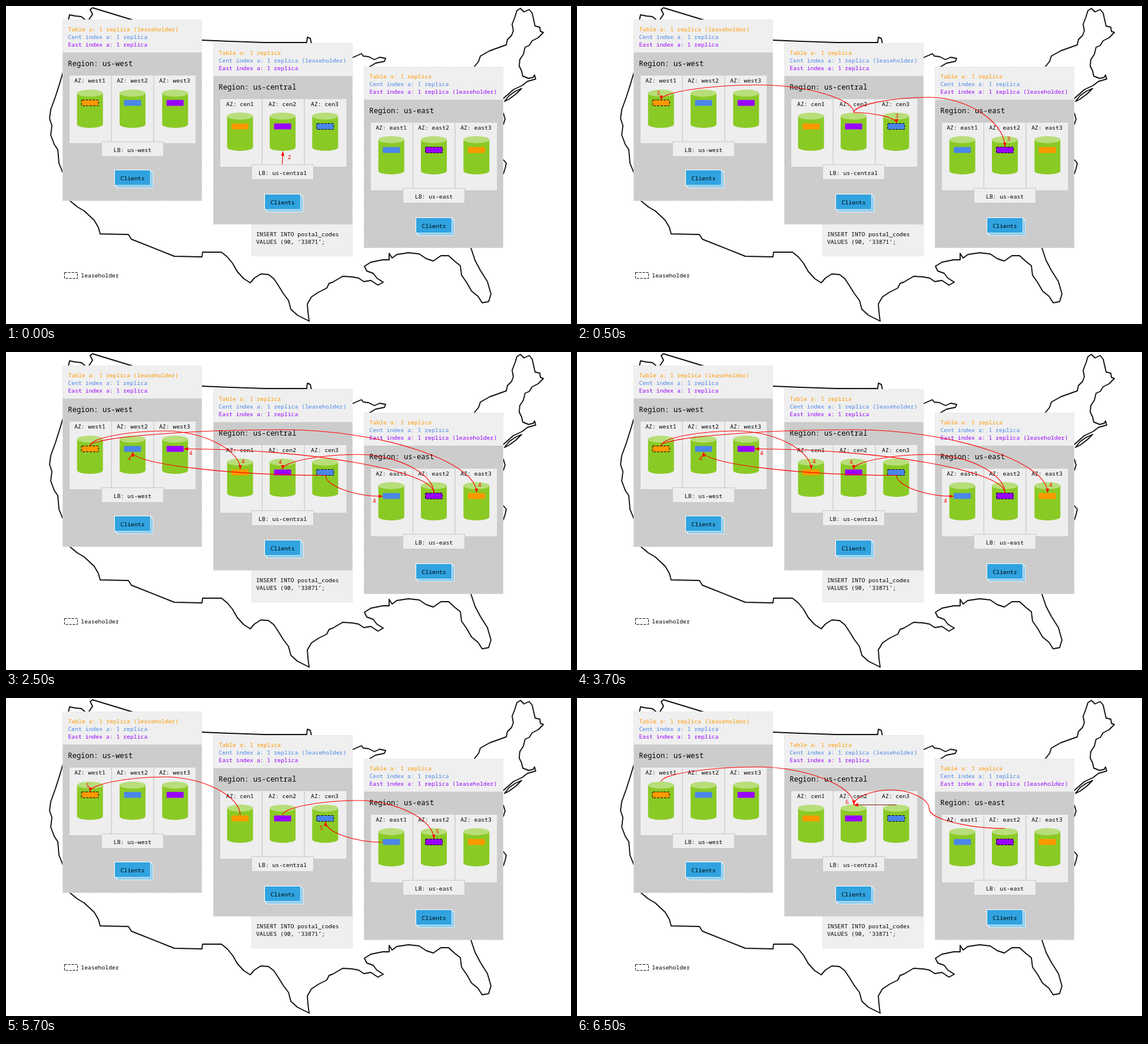
An HTML page that plays this animation: 960x540 px, repeating every 8 s.

```html
<!DOCTYPE html>
<html lang="en">
<head>
<meta charset="utf-8">
<title>Replicated index writes</title>
<style>
  html, body { margin: 0; width: 100%; height: 100%; overflow: hidden; background: #fff; }
  svg { display: block; width: 100vw; height: 100vh; }
  text { font: 9.775px "Noto Sans Mono", "DejaVu Sans Mono", monospace; white-space: pre; }
  .title { font-size: 12.22px; }
  .mid { text-anchor: middle; }
  .map { fill: none; stroke: #111; stroke-width: 1.9; stroke-linejoin: round; stroke-linecap: round; }
  .light { fill: #efefef; }
  .edge { fill: none; stroke: #e2e2e2; stroke-dasharray: 2 2; }
  .box { fill: #eee; stroke: #c8c8c8; }
  .lease { stroke: #000; stroke-dasharray: 4 2; }
  .wire { fill: none; stroke: #f00; stroke-width: 1.1; }
  .step text { fill: #f00; }
  .step { opacity: 0; animation: 8s step-end infinite; }
  #step2 { animation-name: s2; }
  #step3 { animation-name: s3; }
  #step4 { animation-name: s4; }
  #step5 { animation-name: s5; }
  #step6 { animation-name: s6; }
  @keyframes s2 { 0% { opacity: 1 } 6.25%, 100% { opacity: 0 } }
  @keyframes s3 { 0% { opacity: 0 } 6.25% { opacity: 1 } 31.25%, 100% { opacity: 0 } }
  @keyframes s4 { 0% { opacity: 0 } 31.25% { opacity: 1 } 56.25%, 100% { opacity: 0 } }
  @keyframes s5 { 0% { opacity: 0 } 56.25% { opacity: 1 } 81.25%, 100% { opacity: 0 } }
  @keyframes s6 { 0% { opacity: 0 } 81.25%, 100% { opacity: 1 } }
</style>
</head>
<body>
<svg id="stage" viewBox="0 0 960 540">
  <defs>
    <marker id="head" markerUnits="userSpaceOnUse" markerWidth="9" markerHeight="8" refX="7.5" refY="3.5" orient="auto">
      <path d="M0 .5L7.5 3.5L0 6.5Z" fill="#f00"/>
    </marker>
  </defs>
  <g class="map">
    <!-- north-west corner and Pacific coast -->
    <path d="M106 24L108 15L118 17L128 18L134 23M141 23L147 14L143 6L147 3L180 13L216 24"/>
    <path d="M97 112L91 132L84 154L76 176L74 191L78 203L76 219L82 235L88 244L89 255L90 267L97 284"/>
    <!-- southern border -->
    <path d="M109 331L121 341L133 348L150 364L157 376L160 387L208 388L213 396L286 425L333 426L334 418L366 418L376 426L385 437L393 451L404 463L415 470L422 462L433 455L446 456L455 463L463 475L471 488L480 500L484 515L495 525L515 535"/>
    <!-- Gulf and Florida -->
    <path d="M515 535L513 519L512 506L519 494L531 486L545 479L549 471L555 469L572 459L588 460L599 462L608 468L620 466L632 474L641 469L630 462L624 454L613 450L609 442L620 435L640 431L651 431L651 420L656 428L664 422L684 419L702 421L714 429L726 433L739 424L752 424L763 434L772 441L774 457L783 470L791 484L802 493L809 504L820 502L824 489L818 468L806 449L797 432L790 411"/>
    <!-- northern border and lakes -->
    <path d="M333 58L380 60L440 62L511 62L512 53L517 55L519 64M588 88L597 84L604 81L607 85L616 86L626 91L635 87L645 89L643 94L628 97L618 103"/>
    <!-- north-east -->
    <path d="M795 104L803 94L806 85L822 76L850 66L852 57L859 50L862 42L860 31L865 18L868 8L874 4L880 10L889 6L894 12L899 34L907 36L908 43L913 45L904 54L894 59L889 67L882 70L879 82L873 91L872 102L876 110L878 119L888 123L896 121L898 117L900 124L886 128L877 135L862 142L853 150L845 157"/>
    <path d="M847 162L855 152L865 145L876 140L867 149L855 158ZM845 182L848 192L845 201M845 261L850 267L848 276L845 285"/>
  </g>
  <g id="board"></g>
  <g id="wires"></g>
</svg>
<script>
const orange = '#ff9900', blue = '#4a86e8', purple = '#9900ff';
const rect = (x, y, w, h, attrs) => `<rect x="${x}" y="${y}" width="${w}" height="${h}" ${attrs}/>`;
const text = (x, y, str, attrs = '') => `<text x="${x}" y="${y}" ${attrs}>${str}</text>`;

const regions = [
  { name: 'west', az: 'west', x: 96, y: 23, dx: 0, cylY: 119, lbY: 207.5, cliY: 256, chips: [orange, blue, purple], lead: 0 },
  { name: 'central', az: 'cen', x: 352, y: 63, dx: -1, cylY: 118, lbY: 206.5, cliY: 257, chips: [orange, purple, blue], lead: 2 },
  { name: 'east', az: 'east', x: 608, y: 103, dx: 0, cylY: 118, lbY: 206.5, cliY: 257, chips: [blue, purple, orange], lead: 1 }
];

function cylinder(cx, top) {
  const l = cx - 22, r = cx + 22;
  return `<path d="M${l} ${top + 6}V${top + 59}A22 6 0 0 0 ${r} ${top + 59}V${top + 6}Z" fill="#8aca25"/>` +
    `<ellipse cx="${cx}" cy="${top + 6}" rx="22" ry="6" fill="#b8de7a"/>`;
}

function drawRegion(g) {
  const { x, y } = g, mid = x + 119 + g.dx;
  let out = rect(x, y, 237, 56, 'class="light"') + rect(x, y + 56, 237, 252, 'fill="#ccc"') +
    rect(x + .5, y + .5, 236, 307, 'class="edge"');

  const leadColor = g.chips[g.lead];
  [['Table', orange], ['Cent index', blue], ['East index', purple]].forEach(([label, color], i) => {
    const note = color === leadColor ? ' (leaseholder)' : '';
    out += text(x + 9.5, y + 20 + i * 13, `${label} a: 1 replica${note}`, `fill="${color}"`);
  });
  out += text(x + 9.3, y + 78.5, `Region: us-${g.name}`, 'class="title"');

  g.chips.forEach((color, i) => {
    const cx = mid + (i - 1) * 72.3, top = y + g.cylY, lead = i === g.lead;
    out += rect(x + 11.5 + i * 71.8, y + 94.5, 71.8, 116, 'class="box"');
    out += text(mid - .5 + (i - 1) * 72, y + 106.5, `AZ: ${g.az}${i + 1}`, 'class="mid"');
    out += cylinder(cx, top);
    out += rect(cx - 14.5, y + 136.5, 29, 10, `rx="1" fill="${color}" ${lead ? 'class="lease"' : ''}`);
  });

  out += rect(mid - 52.5, y + g.lbY, 105, 25, 'class="box"');
  out += text(mid, y + g.lbY + 17, `LB: us-${g.name}`, 'class="mid"');
  for (const d of [4, 2, 0])
    out += rect(mid - 30.5 + d, y + g.cliY - .5 + d, 61, 26, 'fill="#30a3e0" stroke="#fff"');
  return out + text(mid, y + g.cliY + 16.5, 'Clients', 'class="mid"');
}

document.getElementById('board').innerHTML =
  rect(417, 371, 172, 54, 'class="light"') + rect(417.5, 371.5, 171, 53, 'class="edge"') +
  text(425, 390.5, 'INSERT INTO postal_codes') + text(425, 403.5, 'VALUES (90, ‘33871’;') +
  regions.map(drawRegion).join('') +
  rect(99.5, 452.5, 22, 10, 'fill="none" class="lease"') + text(127.3, 461, 'leaseholder');

// Arc that leaves upward, flattens at height p and comes down on its end
function arc(x1, y1, x2, y2, p) {
  const d = (x2 - x1) / 4;
  return `M${x1} ${y1}C${x1} ${(y1 + p) / 2} ${x1 + d} ${p} ${x1 + 2 * d} ${p}` +
    `S${x2} ${(y2 + p) / 2} ${x2} ${y2}`;
}
// Quarter bends: horizontal first or vertical first
const bendH = (x1, y1, x2, y2) => `M${x1} ${y1}C${(x1 + x2) / 2} ${y1} ${x2} ${(y1 + y2) / 2} ${x2} ${y2}`;
const bendV = (x1, y1, x2, y2) => `M${x1} ${y1}C${x1} ${(y1 + y2) / 2} ${(x1 + x2) / 2} ${y2} ${x2} ${y2}`;

const steps = {
  2: { paths: ['M469.3 269L470.5 247'], labels: [[478.5, 260]] },
  3: {
    paths: [arc(470.5, 181, 143, 159, 134), bendH(470.5, 181, 543, 199), arc(470.5, 181, 727, 239, 155)],
    labels: [[135, 151], [540.5, 190], [730.5, 229]]
  },
  4: {
    paths: [
      arc(143, 159, 398, 199, 134), arc(143, 159, 799.5, 239, 132),
      bendH(543, 209.5, 215, 170), bendV(543, 209.5, 640, 245),
      arc(727, 239, 470, 199, 174), bendV(727, 239, 302, 164.5)
    ],
    labels: [[207, 184], [311, 175], [400, 189], [463, 190], [623, 256], [802, 229]]
  },
  5: {
    paths: [arc(398, 199, 143, 159, 134), arc(470, 199, 727, 239, 174), bendH(640, 245, 543, 210)],
    labels: [[136, 152], [730, 230], [533, 224]]
  },
  6: {
    paths: [
      arc(143, 142, 470.5, 181, 117),
      'M727 221.5C663 221.5 598.5 205 598.5 188.5S566 156 534.5 156S470.5 168.5 470.5 181'
    ],
    extra: '<path class="wire" style="stroke:#7a1a10" marker-end="url(#head)" d="M543 181.5H470"/>',
    labels: [[456, 180]]
  }
};

document.getElementById('wires').innerHTML = Object.entries(steps).map(([n, s]) =>
  `<g class="step" id="step${n}">${s.extra || ''}` +
  s.paths.map(d => `<path class="wire" marker-end="url(#head)" d="${d}"/>`).join('') +
  s.labels.map(([x, y]) => text(x, y, n)).join('') + '</g>').join('');
</script>
</body>
</html>
```
